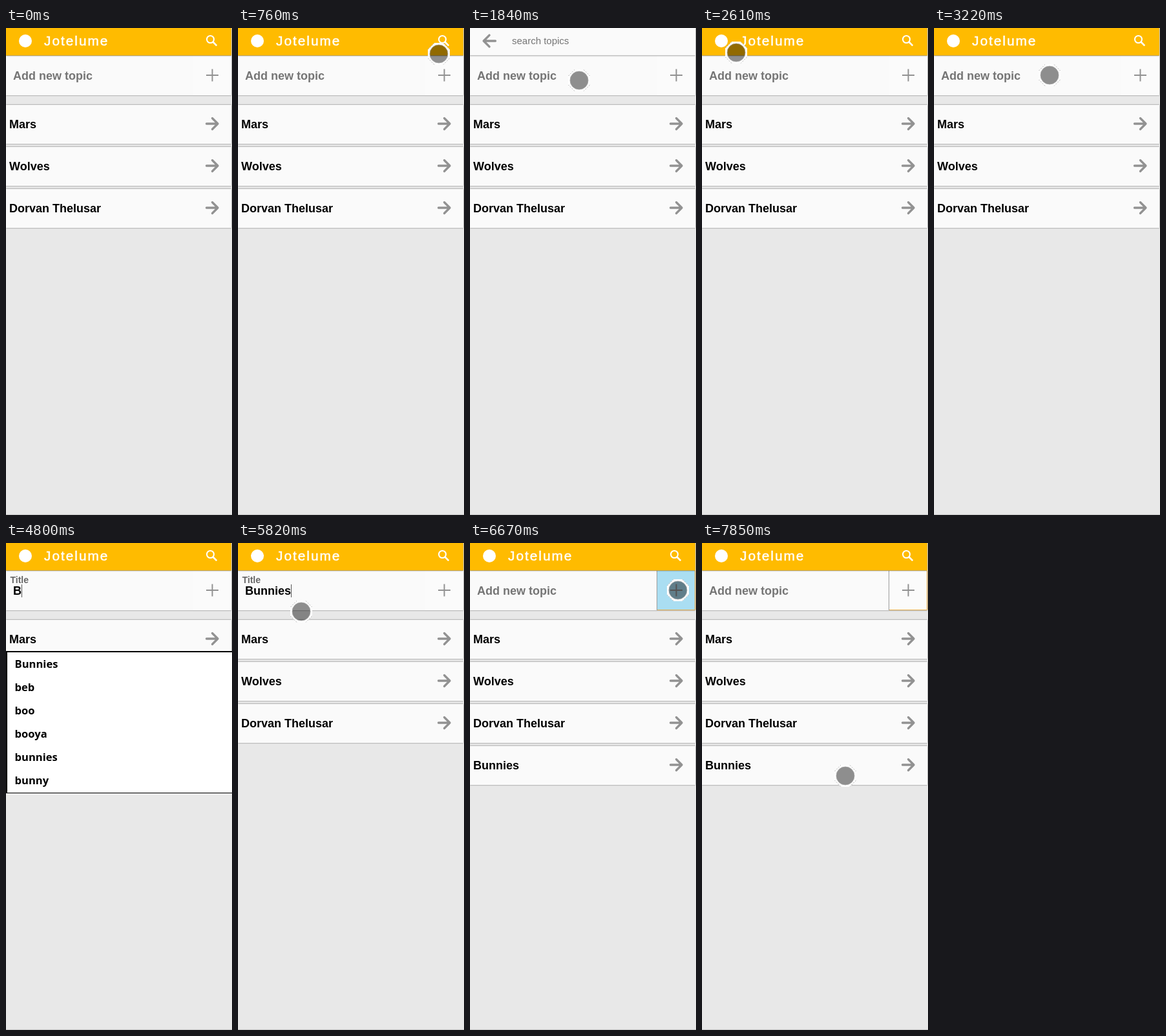
These frames come from a looping animation (350 px wide and 753 px high, 8 s). An HTML page:

```html
<!DOCTYPE html>
<html lang="en">
<head>
<meta charset="utf-8">
<title>Topic list</title>
<style>
  html, body { margin: 0; width: 350px; height: 753px; overflow: hidden; background: #e8e8e8; }
  svg { display: block; font: bold 18px "Liberation Sans", Arial, sans-serif; }
  .card { fill: #fafafa; filter: drop-shadow(0 .5px 1.3px rgba(0,0,0,.55)); }
  .icon { fill: none; stroke: #929292; stroke-width: 3.3; stroke-linecap: round; stroke-linejoin: round; }
  .menu { font: bold 16.6px "Open Sans", "Noto Sans", sans-serif; }
</style>
</head>
<body>
<svg width="350" height="753" viewBox="0 0 350 753">
  <defs>
    <path id="arrow" class="icon" d="M-9 0H8.5M0 -8.5L8.5 0L0 8.5"/>
  </defs>
  <path d="M0 752.5H350" stroke="#c6c6c6"/>
  <g id="topics"></g>

  <rect class="card" y="43" width="349" height="61"/>
  <rect id="addButton" x="290" y="43" width="59" height="61"/>
  <g id="focusRing" fill="none">
    <path d="M289.5 43V104" stroke="#9c9c9c"/>
    <path d="M290 103.5H348.5V43" stroke="#e9b04c"/>
  </g>
  <path class="icon" d="M310 73H329M319.5 63.5V82.5" style="stroke-width:2;stroke-linecap:butt"/>
  <text id="placeholder" x="11" y="80" fill="#757575">Add new topic</text>
  <g id="field">
    <text x="6.5" y="62" font-size="14" fill="#666">Title</text>
    <text id="typed" x="11" y="80"></text>
    <path id="caret" d="M.5 64V84" stroke="#555"/>
  </g>

  <g id="brandBar">
    <rect class="card" width="349" height="42.5" style="fill:#ffbb00"/>
    <circle cx="30" cy="20" r="10" fill="#fff"/>
    <text x="59" y="27" fill="#fff" stroke="#fff" stroke-width=".5" font-size="20.8" font-weight="normal" letter-spacing="2">Jotelume</text>
    <g fill="none" stroke="#fff" stroke-width="2.1">
      <circle cx="316.5" cy="17.5" r="5.5"/>
      <path d="M320.5 21.5L326.3 27.3" stroke-width="2.6"/>
    </g>
  </g>
  <g id="searchBar">
    <rect class="card" width="349" height="42.5"/>
    <use href="#arrow" transform="translate(30 20) scale(-1.04 1.04)"/>
    <text x="65" y="25" fill="#757575" font-size="15" font-weight="normal">search topics</text>
  </g>

  <g id="menu" class="menu"></g>

  <g id="pointer">
    <path fill="#fff" fill-rule="evenodd" d="M-17 -7L-7 -17H7L17 -7V7L7 17H-7L-17 7ZM-14 0A14 14 0 0 0 14 0A14 14 0 0 0 -14 0Z"/>
    <path fill="none" stroke="#000" stroke-opacity=".33" stroke-dasharray="2 2"
      d="M-16.5 -7L-7 -16.5M7 -16.5L16.5 -7M16.5 7L7 16.5M-7 16.5L-16.5 7"/>
    <circle r="14" fill="#000" fill-opacity=".43" stroke="#a0a0a0" stroke-width=".8"/>
  </g>
</svg>
<script>
const LOOP = 8000;
const STEP = 1000 / 13;
const WORD = "Bunnies";
const SUGGESTIONS = ["Bunnies", "beb", "boo", "booya", "bunnies", "bunny"];

const easeOut = u => 1 - (1 - u) ** 2;
const easeInOut = u => u * u * (3 - 2 * u);

// Each pointer move is a quadratic curve: from, control point, to
const MOVES = [
  { start: 70, end: 1070, ease: easeOut, curve: [[150, 641], [268, 75], [322, 27]] },
  { start: 1220, end: 2450, ease: easeInOut, curve: [[322, 27], [165, 138], [30, 21]] },
  { start: 2450, end: 3220, ease: easeInOut, curve: [[30, 21], [146, 110], [179, 73]] },
  { start: 3450, end: 3780, ease: easeInOut, curve: [[179, 73], [258, 95], [243, 78]] },
  { start: 5820, end: 6440, ease: easeInOut, curve: [[98, 106], [240, 48], [322, 73]] },
  { start: 6670, end: 7500, ease: easeInOut, curve: [[322, 73], [285, 290], [186, 387]] },
  { start: 7500, end: 7850, ease: easeInOut, curve: [[186, 387], [190, 380], [224, 359]] }
];

const $ = id => document.getElementById(id);
const show = (id, on) => $(id).style.display = on ? "" : "none";

$("topics").innerHTML = ["Mars", "Wolves", "Dorvan Thelusar", WORD].map((name, i) =>
  `<g transform="translate(0 ${119 + 65 * i})"><rect class="card" width="349" height="60"/>
   <text x="5" y="36">${name}</text><use href="#arrow" x="319.5" y="29"/></g>`).join("");
const newTopic = $("topics").lastElementChild;

function pointerAt(t) {
  const { start, end, ease, curve: [a, b, c] } = MOVES.findLast(m => m.start <= t) ?? MOVES[0];
  // The pointer advances in discrete steps
  const elapsed = Math.floor((t - start + 10) / STEP) * STEP;
  const u = ease(Math.max(0, Math.min(1, elapsed / (end - start - 5))));
  return [0, 1].map(i => Math.round((1 - u) ** 2 * a[i] + 2 * u * (1 - u) * b[i] + u * u * c[i]));
}

// Two slow key presses, then an even burst
function typedLength(t) {
  if (t < 4480) return 0;
  if (t < 4950) return 1;
  return Math.max(2, Math.min(WORD.length, 3 + Math.floor((t - 5120) / 75)));
}

function drawField(t) {
  const editing = t >= 4180 && t < 6670;
  const text = WORD.slice(0, typedLength(t));
  show("field", editing);
  show("placeholder", !editing);
  $("typed").textContent = text;
  const width = editing && text ? $("typed").getComputedTextLength() : 0;
  $("caret").setAttribute("transform", `translate(${Math.round(10.5 + width)} 0)`);

  const open = t >= 4555 && text !== WORD;
  show("menu", open);
  if (!open) return;
  const items = SUGGESTIONS.filter(s => s.toLowerCase().startsWith(text.toLowerCase()));
  const height = 36 * items.length;
  $("menu").innerHTML =
    `<rect y="167" width="350" height="${height + 4}"/>` +
    `<rect x="2" y="169" width="348" height="${height + 1}" fill="#fff"/>` +
    items.map((s, i) => `<text x="13.5" y="${193 + 36 * i}">${s}</text>`).join("");
}

function draw(now) {
  const t = now % LOOP;
  const searching = t >= 1220 && t < 2450;
  show("searchBar", searching);
  show("brandBar", !searching);
  drawField(t);

  const added = t >= 6670;
  newTopic.style.display = added ? "" : "none";
  show("focusRing", added);
  $("addButton").setAttribute("fill", added && t < 6900 ? "#aadef2" : "#fbfbfb");

  show("pointer", t >= 70 && t < 3930 || t >= 5820);
  $("pointer").setAttribute("transform", `translate(${pointerAt(t).join(" ")})`);
  requestAnimationFrame(draw);
}
requestAnimationFrame(draw);
</script>
</body>
</html>
```
